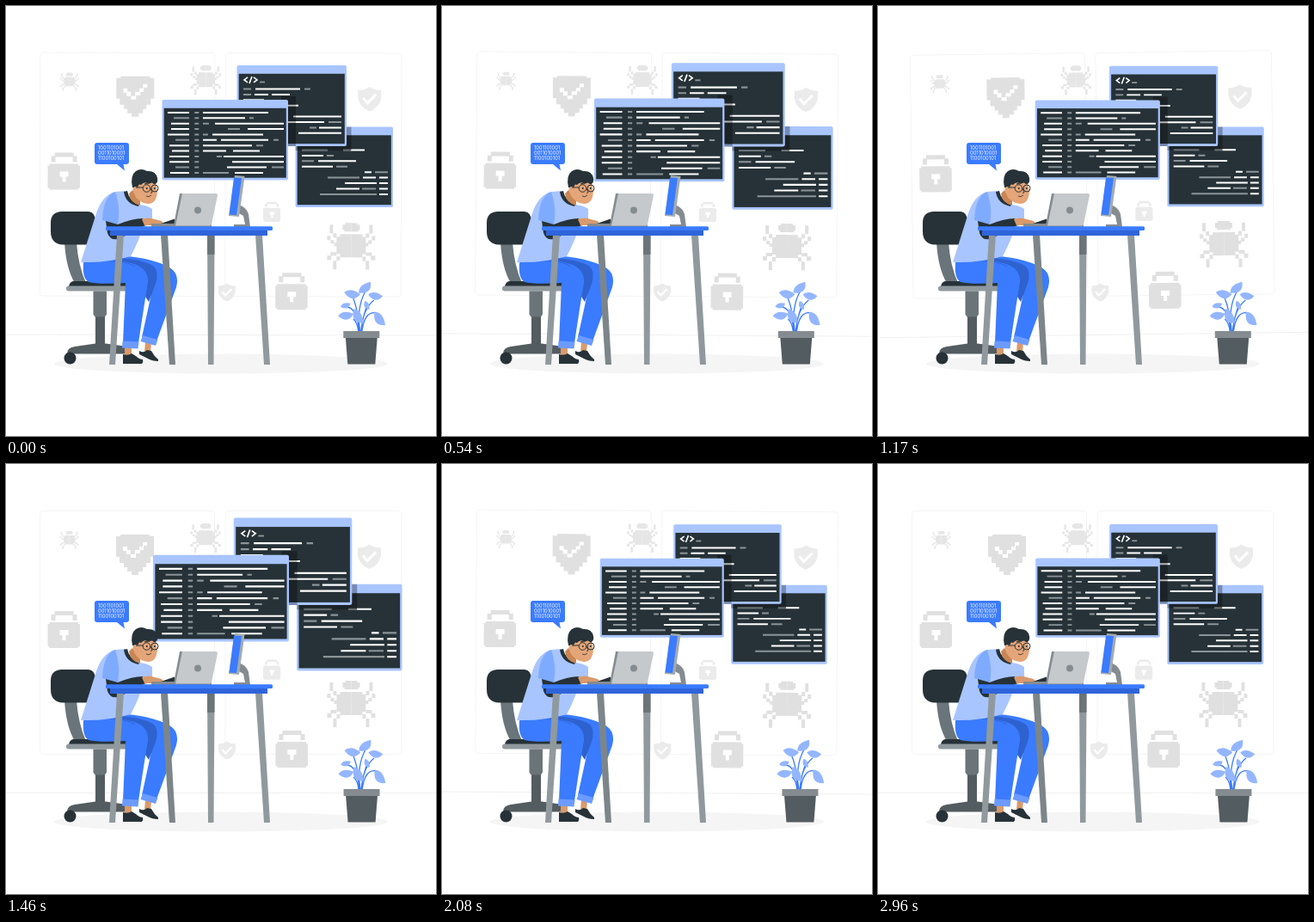
Recreate the animation shown at these times as an HTML page. Size 500 by 500 pixels, loop 3 s.

```html
<!DOCTYPE html>
<html lang="en">
<head>
<meta charset="utf-8">
<title>Coder at a desk</title>
<style>
html, body { margin: 0; width: 100%; height: 100%; overflow: hidden; background: #fff; }
svg { display: block; width: 100vw; height: 100vh; }
text { font: 500 5.7px Inter, sans-serif; fill: #dbe7ff; }
</style>
</head>
<body>
<svg viewBox="0 0 500 500">
  <defs>
    <g id="lock">
      <path d="M8 0h22v4h4v7h-5v-6h-20v6h-5v-7h4zM0 15h2v-2h33.500v2h2v26h-2v2h-33.500v-2h-2z"/>
      <path fill="#fff" d="M14 22h10v6h-3v6h-4v-6h-3z"/>
    </g>
    <g id="bugHalf">
      <path d="M0-27h-7v2h-3v6h2v2h8zM0-14h-13v3h-4v20h4v4h13z"/>
      <path d="M-25-25h4v10h-4zM-21-15h4v5h-4zM-28-12h4v5h-4zM-24-7h4v4h-4zM-20-4h4v4h-4zM-24 7h7v4h-7zM-28 11h5v5h-5zM-17 12h4v5h-4zM-21 17h4v10h-4z"/>
    </g>
    <g id="bug"><use href="#bugHalf"/><use href="#bugHalf" transform="scale(-1 1)"/></g>
    <g id="shield">
      <path d="M0 4Q8 4 13.500 0Q19 4 27 4V13Q25 24 13.500 28.500Q2 24 0 13Z"/>
      <path d="M6 13l5 6 10-10" fill="none" stroke="#fff" stroke-width="3"/>
    </g>
    <path id="leaf" d="M-9 1Q-5-8 9-5Q5 9-9 1"/>
    <clipPath id="clip2"><rect x="268.500" y="69" width="127.500" height="94" rx="2"/></clipPath>
    <clipPath id="clip3"><rect x="336.500" y="140.500" width="113.500" height="93.500" rx="2"/></clipPath>
  </defs>

  <g id="wall" fill="#e0e0e0">
    <g fill="none" stroke="#f5f5f5">
      <rect x="39.500" y="54.500" width="203" height="283" rx="4"/>
      <rect x="255" y="54.500" width="204.500" height="283" rx="4"/>
      <path d="M0 382.500H500" stroke="#f0f0f0"/>
    </g>
    <use href="#lock" x="48.500" y="171"/>
    <use href="#lock" x="313.500" y="310"/>
    <use href="#lock" transform="translate(299 227.500) scale(.54)" fill="#ebebeb"/>
    <use href="#bug" x="401.500" y="279"/>
    <use href="#bug" transform="translate(232 86) scale(.63)" fill="#e6e6e6"/>
    <use href="#bug" transform="translate(73.500 88.500) scale(.39)" fill="#e6e6e6"/>
    <use href="#shield" x="409" y="93.500" fill="#ebebeb"/>
    <use href="#shield" transform="translate(247 322.500) scale(.74)" fill="#ebebeb"/>
    <path d="M133 82h34v2h5v24h-4v7h-5v5h-4v5h-5v4h-8v-4h-5v-5h-4v-5h-5v-7h-4v-24h5z"/>
    <path fill="#fff" d="M136 96h5v4h4v5h5v-5h5v-4h4v-5h5v4h-4v5h-4v4h-5v5h-6v-4h-5v-4h-4z"/>
  </g>

  <ellipse cx="250" cy="416" rx="194" ry="11.500" fill="#f5f5f5"/>

  <g id="windows">
    <g id="win3"></g>
    <path clip-path="url(#clip3)" d="M390 136h11.500v32h-65v-10h54z" opacity=".3"/>
    <g id="win2">
    </g>
    <path clip-path="url(#clip2)" d="M320 105h17v70h-17z" opacity=".3"/>
    <g id="win1"></g>
  </g>

  <g id="bubble">
    <path fill="#3a7bff" d="M106 159h34q3 0 3 3v19q0 3-3 3h-3.500l1.500 7.500-9-7.500h-23q-3 0-3-3v-19q0-3 3-3z"/>
    <text x="107" y="167">1001101001</text>
    <text x="107" y="173">0011010001</text>
    <text x="107" y="179">1100100101</text>
  </g>

  <g id="chair">
    <path fill="#69757a" d="M68 275H82Q84 302 93 322H80Q70 306 68 275Z"/>
    <path fill="#263238" d="M64 239H96Q104 240 104 250V277.500H66Q52 277 52 262V252Q52 240 64 239Z"/>
    <path fill="#263238" d="M78 320H138Q143 320 143 326H73Q74 321 78 320Z"/>
    <rect x="70" y="325.500" width="78" height="6" rx="3" fill="#90999d"/>
    <path fill="#535c60" d="M104 358h11v36h-11z"/>
    <path fill="#6b7579" d="M101.500 331.500h15.500v27l-2 3h-11.500l-2-3z"/>
    <path fill="#535c60" d="M71 404.500Q71 397 80 396L104 392.500h12L141 396V404.500Z"/>
    <circle cx="74.500" cy="409.500" r="7" fill="#263238"/>
  </g>

  <g id="legs">
    <path fill="#d99a6c" d="M162 390l7 2-1 10h-7zM138 396h8v10h-8z"/>
    <path fill="#263238" d="M155 401q5 3 9-1l5 1q3 6 8 10v2q-7 0-12-3l-10-5zM136 405q6 2 10-1l5 3q4 4 8 4 1 3-1 5h-22z"/>
    <path fill="#3a7bff" d="M130 290Q168 292 190 304Q202 311 198 327L175 390 158 385 170 330Z"/>
    <path fill="#2e62cf" d="M118 292Q160 294 172 303Q178 309 174 323L166 344 150 320Z"/>
    <path fill="#3a7bff" d="M91 291Q87 316 96 321Q108 324 139 322L136 392 154 392Q161 345 165 322Q166 307 152 301Q138 296 117 294Z"/>
    <path fill="none" stroke="#2e62cf" stroke-width=".8" d="M117 296Q140 296 150 303"/>
    <path fill="#6c9bff" d="M135.500 389.500l19 1-1 8-18.500-1zM159 383l17.500 5-2.500 7-17.500-5z"/>
  </g>

  <g id="person">
    <path fill="#a9c5ff" d="M127 216Q112 220 105 241L87 298Q118 299 145 291Q154 274 158 261L170 248V236Q163 231 153 231Q141 227 139 215Z"/>
    <path fill="#7fabff" d="M127 216Q113 221 112 249L130 254Q133 238 129 223Z"/>
    <path fill="#263238" d="M137 216l4-1q2 12 14 15l-1 3q-15-3-17-17z"/>
    <path fill="#263238" d="M116 250l14 4q17-7 29-7l3 8-31 16q-10 2-13-7z"/>
    <path fill="#d99a6c" d="M158 248q8-3 15 0l8 2q2 2 0 3l-10 2h-10z"/>
    <path fill="#c98655" d="M147 214l9 10v8q-12-3-13-14z"/>
    <path fill="#e4a578" d="M150 205Q161 199 174 205L176 216Q175 230 165 230Q154 229 149 219Z"/>
    <path fill="#263238" d="M147 211Q144 197 151 192Q157 188 164 192Q174 191 176 200Q177 206 173 207Q169 204 166 207Q161 203 157 208Q154 206 153 212Z"/>
    <ellipse cx="150.500" cy="214" rx="3" ry="4" fill="#e4a578"/>
    <g fill="none" stroke="#263238">
      <circle cx="163.500" cy="212" r="4.300"/>
      <circle cx="173" cy="212" r="4"/>
      <path d="M151 211h8M161 207l4-1M171 206l3 1"/>
      <path stroke-width=".8" d="M163 221q3 2 6-1M168 212l2 5-2 .5"/>
    </g>
    <path fill="#263238" d="M163 211h1.500v2h-1.500zM172 211h1.500v2h-1.500z"/>
  </g>

  <g id="devices">
    <path fill="#263238" d="M180 253l16-5.500v7.500z"/>
    <path fill="#858c91" d="M169 253h28l42 1v3h-70z"/>
    <path fill="#858c91" d="M202 218h41l-8 37h-40z"/>
    <path fill="#c5c9cb" d="M205 218h39q2 0 2 2l-7 34q-.5 1.500-2 1.500h-40z"/>
    <circle cx="223" cy="237.500" r="4" fill="#858c91"/>
    <path fill="#858c91" d="M270 231q10 3 12 11l2 15h-19v-3h13l-2-10-7-4z"/>
    <path fill="#a3abaf" d="M266 197l11.500 1-6.500 47-12-1z"/>
    <path fill="#3a7bff" d="M265 199.500l9 .5-6 43-8.500-.5z"/>
  </g>

  <g id="table">
    <path fill="#7c868a" d="M180 266h8l9 151h-7z"/>
    <path fill="#90999d" d="M234 266h8.500l-1 151h-6.500zM129 266h8l-10 151h-7zM290 266h8l9 151h-7z"/>
    <path fill="#6b7579" d="M234 266h8.500v23h-8.500z"/>
    <path fill="#2f64da" d="M121 260h183v7h-183z"/>
    <rect x="116" y="256.300" width="194" height="4.700" rx="1.500" fill="#3a7bff"/>
  </g>

  <g id="plant">
    <path fill="none" stroke="#3a7bff" stroke-width="1.300" d="M411 379Q408 350 418 332M412 379Q409 352 404 340M413 379Q414 366 419 351M411 379Q408 350 396 350M410 379Q409 368 404 364M413 379Q415 352 428 342M414 379Q417 354 431 357"/>
    <g id="leaves" fill="#94b6ff"></g>
    <path fill="#535c60" d="M395 385h37l-2.500 31.500h-32z"/>
    <path fill="#858c91" d="M392.500 378h42v8h-42z"/>
  </g>
</svg>
<script>
const $ = id => document.getElementById(id);
const LOOP = 3000, LEAD = 50;

// Each row lists dashes as "from-to"; a leading g makes the dash grey.
function addWindow(id, x, y, w, h, top, step, rows) {
  const d = { white: '', grey: '' };
  rows.forEach((row, i) => row.split(' ').filter(Boolean).forEach(dash => {
    const [a, b] = dash.replace('g', '').split('-');
    d[dash[0] === 'g' ? 'grey' : 'white'] += `M${a} ${top + i * step}H${b}`;
  }));
  $(id).innerHTML =
    `<rect x="${x}" y="${y}" width="${w}" height="${h}" rx="2" fill="#a9c5ff"/>
     <rect x="${x + 2.2}" y="${y + 9.8}" width="${w - 4.4}" height="${h - 12.6}" fill="#263238"/>
     <path d="${d.white}" stroke="#fff" stroke-width="2"/>
     <path d="${d.grey}" stroke="#8b9498" stroke-width="2"/>`;
}

addWindow('win1', 181.5, 109, 146.5, 93.5, 124, 6.36, [
  '188-213 229-305',
  'g195-213 229-278 g283-288',
  '192-213 g229-236 243-323',
  '192-213 g258-272 281-323',
  '188-213 g229-235 240-299',
  'g197-213 229-245 250-305 g311-317',
  '190-213 229-286 g291-299',
  '193-213 229-256 264-295',
  '190-213 g245-251 253-323',
  '190-213 263-323',
  'g197-213 257-303 g309-323',
  '191-213 g229-259 266-299'
]);
$('win1').innerHTML += '<path d="M221.8 123V196" stroke="#8b9498" stroke-width="5" stroke-dasharray="2 4.36"/>';

addWindow('win2', 268.5, 69, 127.5, 94, 96.5, 6.42, [
  'g276-285 290-342 g347-354',
  'g276-285 289-305 309-330',
  '276-300',
  '276-340',
  '',
  '334-390',
  '320-370 g375-390',
  'g353-361 364-390',
  '340-390'
]);
$('win2').innerHTML += `<path d="M281 83l-4 3 4 3M288 83l4 3-4 3M286 82l-3 8" fill="none" stroke="#fff" stroke-width="1.6"/>
  <path d="M295 88.500h6" stroke="#8b9498" stroke-width="1.8"/>`;

addWindow('win3', 336.5, 140.5, 113.5, 93.5, 167.5, 6.42, [
  'g344-374 g392-401 401-417',
  '344-369 g373-381',
  'g344-358 363-407',
  '344-380 g384-397',
  '417-425 g429-444',
  'g374-411 415-430 434-444',
  '394-431 434-444',
  '384-411 g414-430 434-444',
  'g365-431 434-444'
]);

// x, y, turn, size
$('leaves').innerHTML = [
  [418, 329, -25, 1], [402, 336, 25, 1], [429, 338, 25, .9], [395, 349, 0, .65],
  [395, 361, 10, .95], [408, 361, 75, 1.05], [419, 348, 80, .6], [433, 364, 70, 1.05]
].map(([x, y, turn, size]) =>
  `<use href="#leaf" transform="translate(${x} ${y}) rotate(${turn}) scale(${size})"/>`).join('');

// Linear interpolation between [time, value] stops.
function tween(p, stops) {
  const i = stops.findIndex(s => p <= s[0]) || 1;
  const [t0, v0] = stops[i - 1], [t1, v1] = stops[i];
  return v0 + (v1 - v0) * (p - t0) / (t1 - t0);
}

const beat = [[0, 1], [.1, 1.1], [.3, 1], [.4, 1], [.5, 1.1], [.6, 1], [1, 1]];
const sway = [[0, 0], [.25, 1], [.75, -1], [1, 0]];
const drift = [[0, 0], [.14, -1.7], [.28, -1.7], [.5, 0], [.65, 2.9], [.8, 3], [1, 0]];

function draw(now) {
  const p = (now + LEAD) % LOOP / LOOP;
  const scale = tween(p, beat) / 1.0167;
  $('windows').setAttribute('transform', `translate(315.5 151.5) scale(${scale}) translate(-315.5 -151.5)`);
  $('wall').setAttribute('transform', `rotate(${tween(p * 2 % 1, sway)} 250 218)`);
  $('plant').setAttribute('transform', `translate(${tween(p, drift)} 0)`);
}

const start = performance.now();
function tick() {
  draw(performance.now() - start);
  requestAnimationFrame(tick);
}
tick();
</script>
</body>
</html>
```
